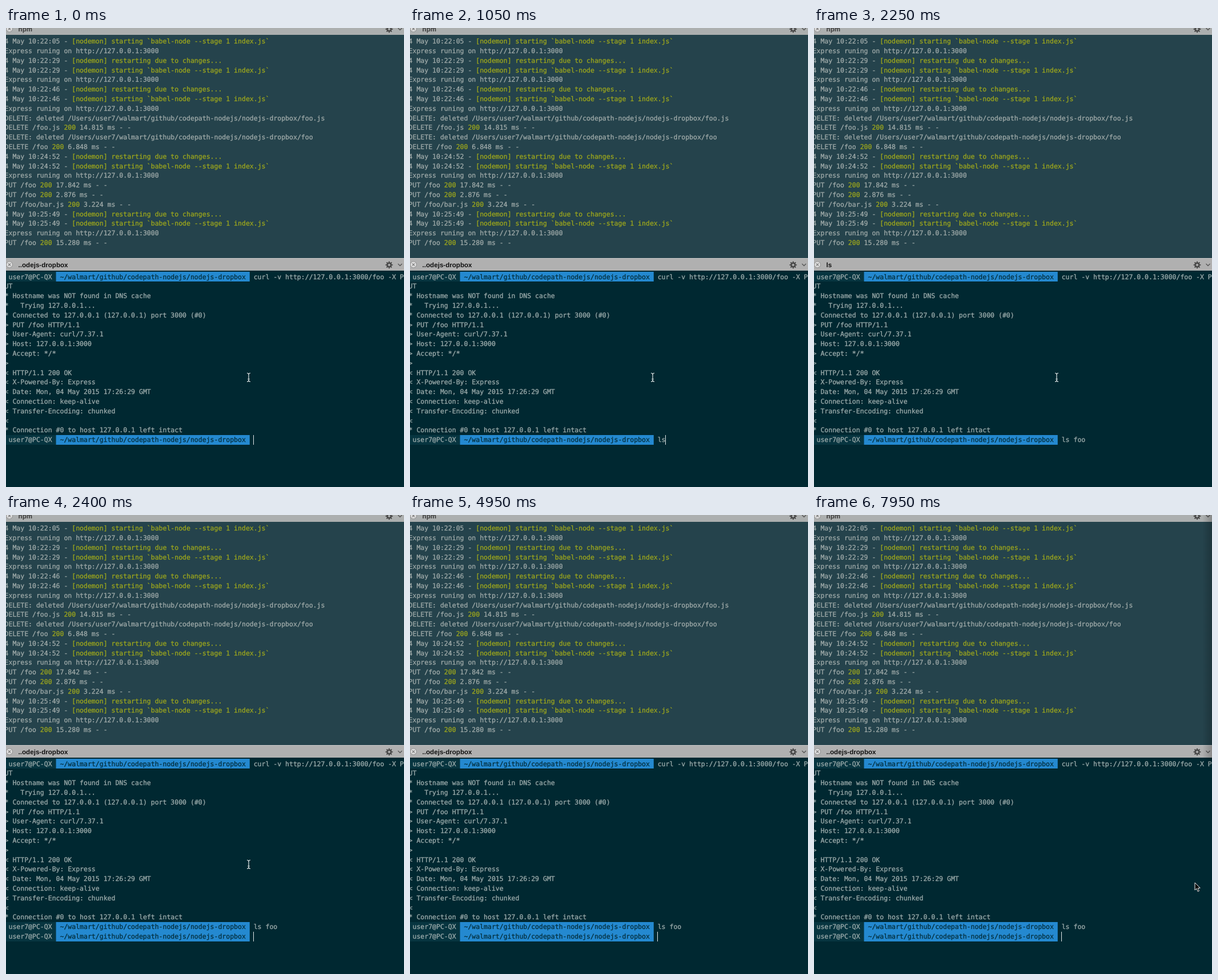
Animation, 697 px wide and 804 px high, one loop 8000 ms. Source, as an HTML page with a canvas:

```html
<!DOCTYPE html>
<html lang="en">
<head>
<meta charset="utf-8">
<title>Terminal</title>
<style>
  html, body { margin: 0; width: 100%; height: 100%; overflow: hidden; background: #002831; }
  canvas { display: block; }
</style>
</head>
<body>
<canvas id="stage" width="697" height="804"></canvas>
<script>
const ctx = document.getElementById('stage').getContext('2d');
const W = 697, H = 804, LOOP = 8000;
const CELL = 6.923, LINE = 16.8, LEFT = -2.45, BASELINE = 12.3;
const UPPER = 14.9, LOWER = 427.3, BAR = 403, BAR_HEIGHT = 22;
const MONO = '11.5px "DejaVu Sans Mono", monospace';
const LABEL = 'bold 11.6px "Liberation Sans", sans-serif';
const COLOR = {
  upperBg: '#25434c', upperText: '#9faaa9', yellow: '#9ca61d',
  lowerBg: '#002831', lowerText: '#9cabab', host: '#073540',
  blue: '#2489d0', pathText: '#04303f', caret: '#e2e8e8'
};

const USER = 'user7';
const HOST = `${USER}@PC-QX`;
const PATH = 'walmart/github/codepath-nodejs/nodejs-dropbox';

// Text between braces is drawn in yellow.
const restart = time => [
  `4 May ${time} - {[nodemon] restarting due to changes...}`,
  ...start(time)
];
const start = time => [
  `4 May ${time} - {[nodemon] starting \`babel-node --stage 1 index.js\`}`,
  'Express runing on http://127.0.0.1:3000'
];
const request = (name, ms) => `${name} {200} ${ms} ms - -`;

const serverLog = [
  ...start('10:22:05'),
  ...restart('10:22:29'),
  ...restart('10:22:46'),
  `DELETE: deleted /Users/${USER}/${PATH}/foo.js`,
  request('DELETE /foo.js', '14.815'),
  `DELETE: deleted /Users/${USER}/${PATH}/foo`,
  request('DELETE /foo', '6.848'),
  ...restart('10:24:52'),
  request('PUT /foo', '17.842'),
  request('PUT /foo', '2.876'),
  request('PUT /foo/bar.js', '3.224'),
  ...restart('10:25:49'),
  request('PUT /foo', '15.280')
];

const curlOutput = [
  'UT',
  '* Hostname was NOT found in DNS cache',
  '*   Trying 127.0.0.1...',
  '* Connected to 127.0.0.1 (127.0.0.1) port 3000 (#0)',
  '> PUT /foo HTTP/1.1',
  '> User-Agent: curl/7.37.1',
  '> Host: 127.0.0.1:3000',
  '> Accept: */*',
  '>',
  '< HTTP/1.1 200 OK',
  '< X-Powered-By: Express',
  '< Date: Mon, 04 May 2015 17:26:29 GMT',
  '< Connection: keep-alive',
  '< Transfer-Encoding: chunked',
  '<',
  '* Connection #0 to host 127.0.0.1 left intact'
];

const colX = col => LEFT + col * CELL;

function rect(x, y, w, h, color) {
  ctx.fillStyle = color;
  ctx.fillRect(x, y, w, h);
}

// A hairline stroke gives the slightly heavy smoothing of the terminal font.
function text(str, col, top, color) {
  ctx.font = MONO;
  ctx.fillStyle = ctx.strokeStyle = color;
  ctx.lineWidth = 0.3;
  ctx.fillText(str, colX(col), top + BASELINE);
  ctx.strokeText(str, colX(col), top + BASELINE);
}

function logLine(line, top) {
  let col = 0;
  line.split(/[{}]/).forEach((part, i) => {
    text(part, col, top, i % 2 ? COLOR.yellow : COLOR.upperText);
    col += part.length;
  });
}

function prompt(row, command) {
  const top = LOWER + row * LINE;
  const y = Math.round(top), h = Math.round(top + LINE) - y;
  const pathStart = colX(13), pathEnd = colX(62);
  rect(0, y, pathStart, h, COLOR.host);
  rect(pathStart, y, pathEnd - pathStart, h, COLOR.blue);
  text(HOST, 1, top, COLOR.lowerText);
  text(`~/${PATH}`, 14, top, COLOR.pathText);
  text(command, 63, top, COLOR.lowerText);
}

function gear(x, y, hole) {
  ctx.strokeStyle = '#4a4a4a';
  ctx.lineWidth = 2;
  ctx.beginPath();
  for (let i = 0; i < 8; i++) {
    const a = i * Math.PI / 4;
    ctx.moveTo(x, y);
    ctx.lineTo(x + 6.3 * Math.cos(a), y + 6.3 * Math.sin(a));
  }
  ctx.stroke();
  disc(x, y, 4.6, '#4a4a4a');
  disc(x, y, 2, hole);
}

function disc(x, y, r, color) {
  ctx.fillStyle = color;
  ctx.beginPath();
  ctx.arc(x, y, r, 0, 2 * Math.PI);
  ctx.fill();
}

function polyline(points, color, width) {
  ctx.strokeStyle = color;
  ctx.lineWidth = width;
  ctx.beginPath();
  points.forEach(([x, y]) => ctx.lineTo(x, y));
  ctx.stroke();
}

function titleBar(y, title, bg, color) {
  rect(0, y, W, BAR_HEIGHT, bg);
  rect(0, y, W, 1, '#cdcdcd');
  const mid = y + 11.5;
  disc(6, mid, 5.8, '#8a8a8a');
  disc(6, mid, 5, '#dcdcdc');
  polyline([[3.8, mid - 2.2], [8.2, mid + 2.2]], '#7a7a7a', 1.2);
  polyline([[8.2, mid - 2.2], [3.8, mid + 2.2]], '#7a7a7a', 1.2);
  ctx.font = LABEL;
  ctx.fillStyle = color;
  ctx.fillText(title, 21.6, y + 15.5);
  gear(671, mid + 0.5, bg);
  polyline([[686.5, mid - 1.5], [690, mid + 2], [693.5, mid - 1.5]], '#555', 1.3);
}

function iBeam(x, y) {
  ctx.strokeStyle = '#dfe5e5';
  ctx.lineWidth = 1.2;
  ctx.beginPath();
  for (const s of [-1, 1]) {
    ctx.moveTo(x - 3, y + 7.5 * s);
    ctx.quadraticCurveTo(x, y + 7.5 * s, x, y + 5 * s);
    ctx.quadraticCurveTo(x, y + 7.5 * s, x + 3, y + 7.5 * s);
  }
  ctx.moveTo(x, y - 6);
  ctx.lineTo(x, y + 6);
  ctx.moveTo(x - 1.8, y + 3);
  ctx.lineTo(x + 1.8, y + 3);
  ctx.stroke();
}

function arrow(x, y) {
  const outline = [[0, 0], [0, 13], [3, 10.3], [5.2, 15.5], [7.4, 14.5], [5.3, 9.6], [9.2, 9.3]];
  ctx.beginPath();
  outline.forEach(([dx, dy]) => ctx.lineTo(x + dx, y + dy));
  ctx.closePath();
  ctx.fillStyle = '#080808';
  ctx.fill();
  ctx.strokeStyle = '#eeeeee';
  ctx.lineWidth = 1;
  ctx.stroke();
}

// Soft shadow cast by a neighbouring window beyond the right edge.
function edgeShadow() {
  const fade = ctx.createLinearGradient(680, 0, W, 0);
  fade.addColorStop(0, 'rgba(0,0,0,0)');
  fade.addColorStop(1, 'rgba(0,0,0,0.22)');
  rect(680, 0, 17, 426, fade);
  const corner = ctx.createRadialGradient(W, 426, 0, W, 426, 15);
  corner.addColorStop(0, 'rgba(0,0,0,0.22)');
  corner.addColorStop(1, 'rgba(0,0,0,0)');
  rect(680, 426, 17, 15, corner);
}

function typed(t) {
  if (t < 1050) return '';
  return 'ls foo'.slice(0, Math.min(6, 2 + Math.floor((t - 1050) / 150)));
}

function draw(t) {
  const command = typed(t);
  const finished = t >= 2400;
  const caretOn = t < 150 || (t >= 1050 && t < 2100) || (finished && t < 3900) || t >= 4950;

  rect(0, 0, W, BAR, COLOR.upperBg);
  rect(0, BAR, W, H - BAR, COLOR.lowerBg);
  serverLog.forEach((line, i) => logLine(line, UPPER + i * LINE));

  prompt(0, 'curl -v http://127.0.0.1:3000/foo -X P');
  curlOutput.forEach((line, i) => text(line, 0, LOWER + (i + 1) * LINE, COLOR.lowerText));
  prompt(17, command);
  if (finished) prompt(18, '');
  if (caretOn) {
    const col = 63 + (finished ? 0 : command.length);
    rect(Math.floor(colX(col)), finished ? 730 : 713, 1, 17, COLOR.caret);
  }

  titleBar(BAR - 413, 'npm', '#acafaf', '#3c3c3c');
  titleBar(BAR, t >= 2250 && !finished ? 'ls' : '..odejs-dropbox', '#b0b0b0', '#111');

  if (t >= 5400) edgeShadow();
  if (t < 4350) iBeam(425, 612);
  else if (t < 4500) iBeam(467.5, 574);
  if (t >= 7950) arrow(667, 644);
}

ctx.textRendering = 'geometricPrecision';
ctx.lineJoin = 'round';
const begin = performance.now();
function tick() {
  draw((performance.now() - begin) % LOOP);
  requestAnimationFrame(tick);
}
tick();
</script>
</body>
</html>
```
